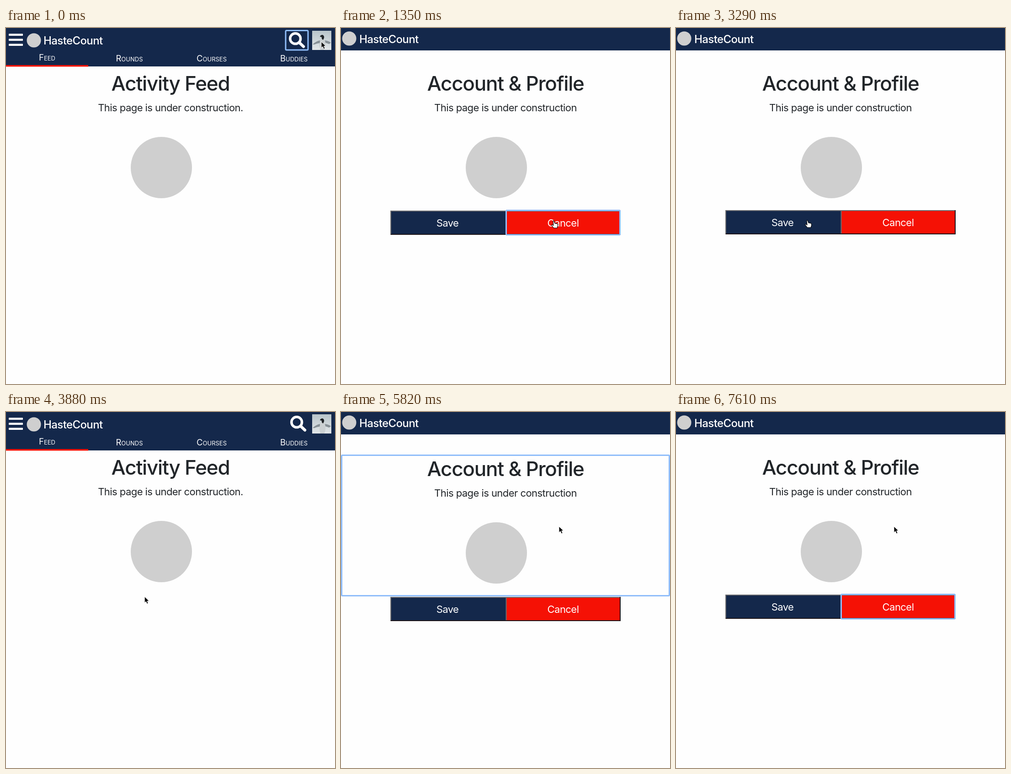
An HTML page that plays this animation: 720x778 px, repeating every 8 s.

```html
<!DOCTYPE html>
<html lang="en">
<head>
<meta charset="utf-8">
<title>Account and profile demo</title>
<style>
  html, body { margin: 0; width: 100%; height: 100%; overflow: hidden; background: #fefefe; }
  svg { display: block; width: 100%; height: 100%; }
  text { font-family: Inter, "Open Sans", sans-serif; font-optical-sizing: none; fill: #212529; }
  .mid { text-anchor: middle; }
  .title { font-size: 44px; font-weight: 500; letter-spacing: -.028em; }
  .note { font-size: 22px; letter-spacing: -.025em; }
  .brand { font-size: 24px; font-weight: 500; letter-spacing: -.025em; fill: #fff; }
  .tab { font-size: 18.5px; font-variant: small-caps; fill: #fff; }
  .button { font-size: 22px; letter-spacing: -.025em; fill: #fff; }
  .bar { fill: #14284b; }
  .mark { fill: #cfcfcf; }
  .red { fill: #f51105; }
  .white { fill: #fff; }
  .ring { fill: none; stroke: #8fbdfa; stroke-width: 3; }
</style>
</head>
<body>
<svg viewBox="0 0 720 778">
  <defs>
    <linearGradient id="sky" x2="0" y2="1">
      <stop offset="0" stop-color="#b8c4ca"/>
      <stop offset="1" stop-color="#e2e6e8"/>
    </linearGradient>
  </defs>

  <g id="feed">
    <rect class="bar" width="720" height="84"/>
    <rect class="red" y="81" width="180" height="3.5"/>
    <g class="white">
      <rect x="6" y="12.5" width="31" height="4.6" rx="1"/>
      <rect x="6" y="23.5" width="31" height="4.6" rx="1"/>
      <rect x="6" y="34.5" width="31" height="4.6" rx="1"/>
    </g>
    <circle class="mark" cx="61" cy="27" r="15.5"/>
    <text class="brand" x="82" y="35.5">HasteCount</text>
    <g id="searchIcon" fill="none" stroke="#fff">
      <circle cx="636.2" cy="22.2" r="11.4" stroke-width="5.5"/>
      <path d="M645 31L654 39.5" stroke-width="6.4" stroke-linecap="round"/>
    </g>
    <g id="avatar">
      <rect width="42" height="42" fill="url(#sky)"/>
      <path d="M17 21Q8 23 1 30L5 30Q12 27 17 27ZM28 21Q36 22 41 26L37 29Q32 27 28 26Z" fill="#879096"/>
      <path d="M16 33Q16 19 22 14Q30 18 29 32Q29 39 26 42H18Z" fill="#cbd0d2"/>
      <path d="M17 13Q18 9 23 9Q27 11 26 16L24 20Q20 18 21 14Z" fill="#1e2226"/>
    </g>
    <text class="tab mid" x="90" y="70.5">Feed</text>
    <text class="tab mid" x="270" y="72.5">Rounds</text>
    <text class="tab mid" x="450" y="72.5">Courses</text>
    <text class="tab mid" x="630" y="72.5">Buddies</text>
    <text class="title mid" x="360" y="137">Activity Feed</text>
    <text class="note mid" x="360" y="181.5">This page is under construction.</text>
    <circle class="mark" cx="340" cy="305" r="67"/>
    <rect id="searchRing" class="ring" x="612" y="5.5" width="49" height="42.5" rx="2"/>
    <rect id="avatarRing" class="ring" x="671" y="6" width="41" height="40.5" rx="2"/>
  </g>

  <g id="account">
    <rect class="bar" width="720" height="49"/>
    <circle class="mark" cx="18" cy="23" r="15.5"/>
    <text class="brand" x="40" y="32.5">HasteCount</text>
    <g id="content">
      <text class="title mid" x="360" y="137">Account &amp; Profile</text>
      <text class="note mid" x="360" y="181.5">This page is under construction</text>
      <circle class="mark" cx="340" cy="305" r="67"/>
    </g>
    <rect id="contentRing" class="ring" x="1.5" y="94.5" width="717" height="307" rx="1.5"/>
    <g id="buttons">
      <rect class="bar" x="108" y="398" width="253" height="53"/>
      <rect class="red" x="361" y="398" width="251" height="53"/>
      <g fill="none" stroke-width="2">
        <path d="M109 451V399H361M361.5 451V399H611" stroke="#6c6c70"/>
        <path d="M109 450H361M361 450H611V398" stroke="#1d1418"/>
      </g>
      <text class="button mid" x="233" y="432.5">Save</text>
      <text class="button mid" x="486" y="432.5">Cancel</text>
      <rect id="saveRing" class="ring" x="108.5" y="397.5" width="252" height="53.5" rx="1.5"/>
      <rect id="cancelRing" class="ring" x="361.5" y="397.5" width="249" height="53.5" rx="1.5"/>
    </g>
  </g>

  <g id="cursor">
    <path id="arrow" d="M0 0V13.5L3.2 10.6L5.4 15.8L8 14.7L5.8 9.6H10Z" stroke="#fff"/>
    <path id="hand" d="M0 1Q1-.5 2.2 1L4 6Q5.5 5 6.4 6.4Q8 5.6 8.8 7Q10.4 6.6 10.5 8.6V12L9 16H1.5L-3 10.5Q-3.4 8.6-1.6 8.8L1 10.5Z"
      fill="#fff" stroke="#000" stroke-width="1.1" stroke-linejoin="round"/>
  </g>
</svg>
<script>
  const LOOP = 8000, STEP = 147;

  // start time, page, focused element
  const scenes = [
    [0, 'feed', 'search'], [150, 'account'], [1350, 'account', 'cancel'],
    [1490, 'feed'], [2540, 'account'], [3590, 'feed'], [4920, 'feed', 'avatar'],
    [5070, 'account'], [5820, 'account', 'content'], [6270, 'account', 'save'],
    [6570, 'account', 'cancel'], [7020, 'account', 'content'],
    [7310, 'account', 'save'], [7610, 'account', 'cancel']
  ];
  // start time, number of steps, end point
  const moves = [
    [600, 5, 464, 421], [1640, 6, 686, 37], [2690, 1, 624, 101],
    [2840, 4, 286, 420], [3740, 8, 686, 37], [4920, 1, 678, 33], [5070, 3, 477, 250]
  ];
  const handTimes = [[1200, 1490], [2390, 2540], [3290, 3590]];

  const el = id => document.getElementById(id);
  const show = (id, on) => { el(id).style.display = on ? '' : 'none'; };
  const place = (id, x, y) => el(id).setAttribute('transform', `translate(${x} ${y})`);
  const smooth = p => p * p * (3 - 2 * p);

  function cursorAt(t) {
    let x = 690, y = 30;
    for (const [start, steps, endX, endY] of moves) {
      if (t < start) break;
      const p = smooth(Math.min(steps, Math.floor((t - start) / STEP) + 1) / steps);
      x += (endX - x) * p;
      y += (endY - y) * p;
    }
    return [x, y];
  }

  function draw(t) {
    const [, page, focus] = scenes.filter(scene => scene[0] <= t).pop();
    for (const id of ['feed', 'account']) show(id, id === page);
    for (const id of ['search', 'avatar', 'content', 'save', 'cancel']) show(id + 'Ring', id === focus);

    const searching = focus === 'search', reading = focus === 'content';
    place('searchIcon', searching ? -3 : 0, searching ? 1 : 0);
    place('avatar', 670, searching ? 6 : 5);
    place('content', 0, reading ? 3 : 0);
    place('buttons', 0, reading ? 6 : focus ? 1 : 0);

    const hand = handTimes.some(([from, to]) => t >= from && t < to);
    show('hand', hand);
    show('arrow', !hand);
    place('cursor', ...cursorAt(t));
  }

  const begin = performance.now();
  function tick() {
    draw((performance.now() - begin) % LOOP);
    requestAnimationFrame(tick);
  }
  tick();
</script>
</body>
</html>
```
